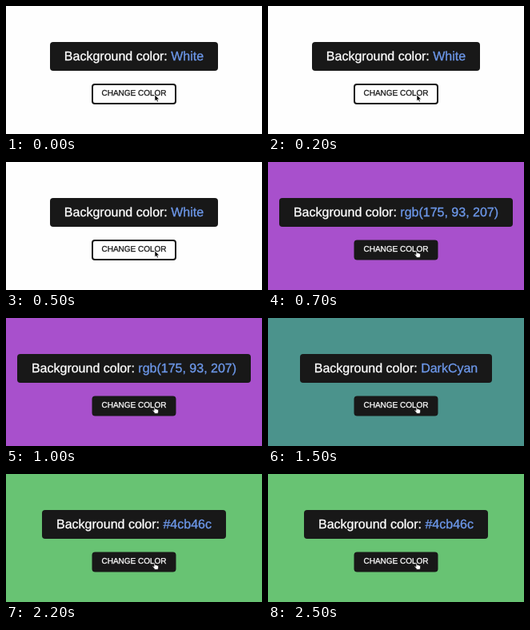
An HTML page that plays this animation: 320x160 px, repeating every 2.8 s.

```html
<!DOCTYPE html>
<html lang="en">
<head>
<meta charset="utf-8">
<title>Background color</title>
<style>
  html, body {
    margin: 0;
    width: 100%;
    height: 100%;
    overflow: hidden;
    background: #fefefe;
  }
  .scene {
    position: absolute;
    top: 0;
    left: 0;
    width: 320px;
    height: 160px;
    box-sizing: border-box;
    padding-top: 45px;
    display: flex;
    flex-direction: column;
    align-items: center;
    background: var(--bg);
    font-family: "Liberation Sans", Arial, sans-serif;
    text-rendering: geometricPrecision;
    -webkit-text-stroke: .3px;
    color: #fff;
  }
  .title {
    height: 36px;
    padding: 0 18px;
    border-radius: 4px;
    background: #181818;
    font-size: 16px;
    line-height: 38px;
    white-space: nowrap;
  }
  .title span { color: #6d98ea; }
  .button {
    width: 104px;
    height: 24px;
    margin-top: 17px;
    border-radius: 3.5px;
    background: #181818;
    box-shadow: 0 0 .5px .5px #181818;
    font-size: 10px;
    line-height: 24px;
    text-align: center;
    white-space: nowrap;
  }
  .idle .button {
    box-sizing: border-box;
    width: 106px;
    height: 26px;
    margin-top: 16px;
    border: 2px solid #181818;
    border-radius: 4px;
    background: #fefefe;
    box-shadow: none;
    line-height: 22px;
    color: #181818;
  }
  .cursor {
    position: absolute;
    top: 0;
    left: 0;
    stroke-linejoin: round;
  }

  /* Each scene covers the ones before it once it appears. */
  .purple { --bg: #a850cc; animation: from700 2.8s step-end infinite; }
  .cyan   { --bg: #4b938c; animation: from1500 2.8s step-end infinite; }
  .green  { --bg: #68c373; animation: from2200 2.8s step-end infinite; }
  .idle   { --bg: #fefefe; }
  @keyframes from700  { 0% { visibility: hidden } 25%, 100% { visibility: visible } }
  @keyframes from1500 { 0% { visibility: hidden } 53.5714%, 100% { visibility: visible } }
  @keyframes from2200 { 0% { visibility: hidden } 78.5714%, 100% { visibility: visible } }
</style>
</head>
<body>
<svg width="0" height="0" style="position:absolute">
  <path id="arrow" d="M186 111v7.8l1.8-1.6 1.2 2.7 1.4-.6-1.2-2.6h2.4z"
        fill="#000" stroke="#fff" stroke-width=".6"/>
  <path id="hand" d="M185 111.3q.9-.8 1.5.2v2.3l1-.2.6.5 1-.1.5.6 1 .2v2.4l-.8 2.2h-3.9l-1.2-2-1.7-1.9q.2-1 1.2-.4l.8.7z"
        fill="#fff" stroke="#111" stroke-width=".7"/>
</svg>

<div class="scene idle">
  <div class="title">Background color: <span>White</span></div>
  <div class="button">CHANGE COLOR</div>
  <svg class="cursor" width="320" height="160"><use href="#arrow"/></svg>
</div>
<div class="scene purple">
  <div class="title">Background color: <span>rgb(175, 93, 207)</span></div>
  <div class="button">CHANGE COLOR</div>
  <svg class="cursor" width="320" height="160"><use href="#hand"/></svg>
</div>
<div class="scene cyan">
  <div class="title">Background color: <span>DarkCyan</span></div>
  <div class="button">CHANGE COLOR</div>
  <svg class="cursor" width="320" height="160"><use href="#hand"/></svg>
</div>
<div class="scene green">
  <div class="title">Background color: <span>#4cb46c</span></div>
  <div class="button">CHANGE COLOR</div>
  <svg class="cursor" width="320" height="160"><use href="#hand"/></svg>
</div>
</body>
</html>
```
